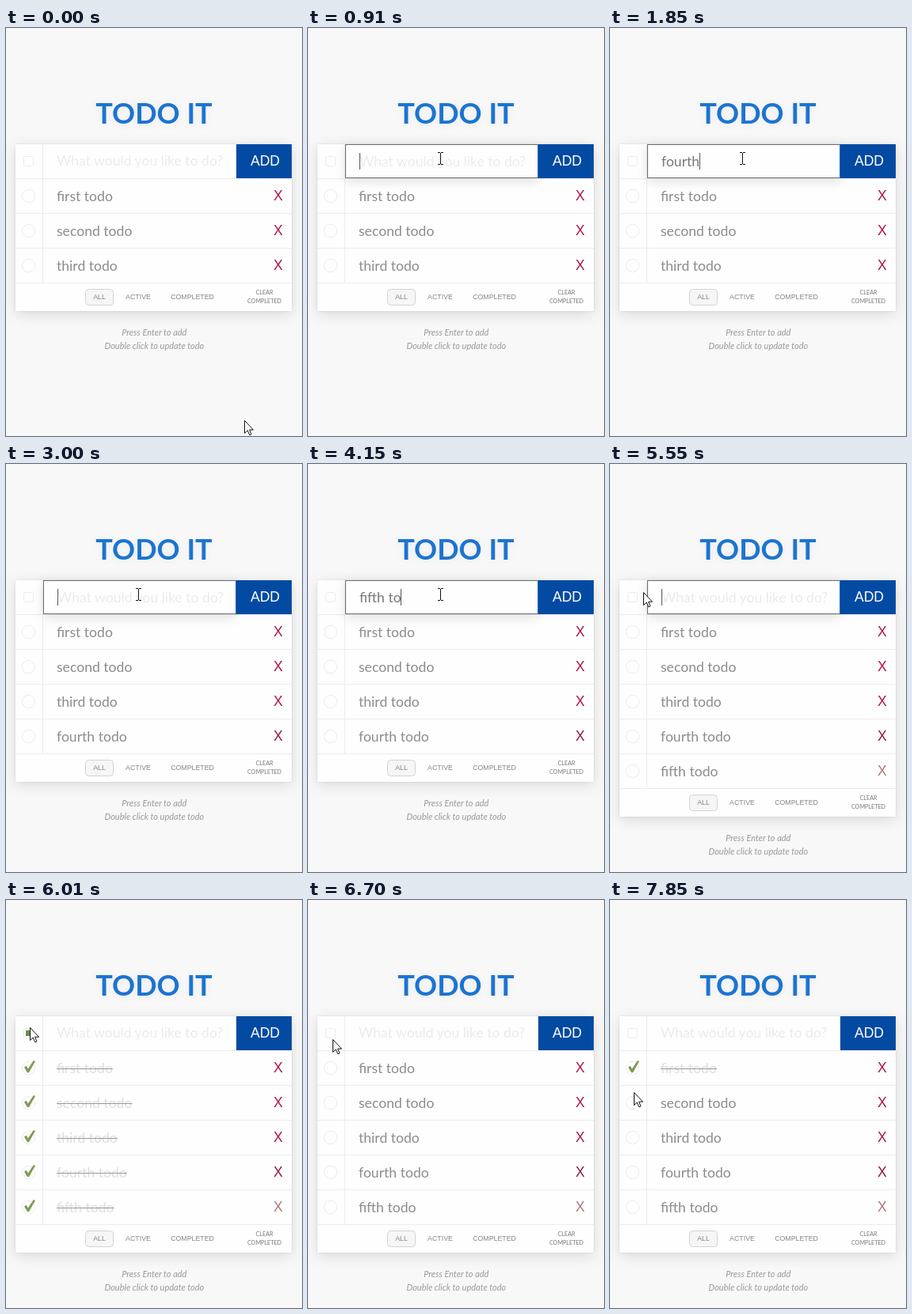
Animation of 374 by 516 pixels, one loop 8000 ms. Source, as an HTML page:

```html
<!DOCTYPE html>
<html lang="en">
<head>
<meta charset="utf-8">
<title>Todo list</title>
<style>
html, body { margin: 0; width: 100%; height: 100%; overflow: hidden; background: #f8f8f8; }
svg { display: block; width: 374px; height: 516px; font: 17.6px Lato, sans-serif; }
.mid { text-anchor: middle; }
.title { font-size: 36px; font-weight: 700; fill: #1b74d1; filter: drop-shadow(0 1px 5px rgba(0,0,0,.06)); }
.card { fill: #fefefe; filter: drop-shadow(0 4px 9px rgba(0,0,0,.12)) drop-shadow(0 0 1px rgba(0,0,0,.1)); }
.line { stroke: #ececec; fill: none; }
.item { fill: #8c8c8c; }
.done { fill: #dedede; }
.strike { stroke: #999; }
.hint { fill: #ebebeb; }
.value { fill: #777; }
.arial { font-family: "Liberation Sans", Arial, sans-serif; }
.filter { font-size: 8.8px; fill: #858585; }
.clear { font-size: 7.2px; fill: #777; }
.info { font-size: 11px; font-style: italic; fill: #999; }
.focus { fill: #fefefe; stroke: #6c6f72; filter: drop-shadow(0 4px 7px rgba(0,0,0,.12)); }
.tick { fill: #829a55; }
</style>
</head>
<body>
<svg id="stage" viewBox="0 0 374 516"></svg>
<script>
const LOOP = 8000, ROW = 44;
const names = ['first', 'second', 'third', 'fourth', 'fifth'].map(n => n + ' todo');
const crosses = ['#b0124a', '#b0124a', '#b0124a', '#951545', '#b27476'];
const stage = document.getElementById('stage');
const ruler = document.createElement('canvas').getContext('2d');

// Each step changes only the listed properties.
const steps = [
  [0, { pointer: 'arrow', x: 301, y: 496, focus: false, caret: true, value: '', rows: 3, done: 0, all: false, pending: false }],
  [210, { x: 264, y: 412 }],
  [440, { x: 203, y: 262 }],
  [670, { pointer: 'beam', x: 167, y: 165 }],
  [910, { focus: true }],
  [1140, { caret: false }],
  [1370, { caret: true, value: 'f' }],
  [1600, { value: 'four' }],
  [1850, { value: 'fourth' }],
  [2080, { value: 'fourth t' }],
  [2310, { value: 'fourth tod' }],
  [2540, { value: 'fourth todo' }],
  [3000, { value: '', rows: 4 }],
  [3460, { value: 'fi' }],
  [3690, { value: 'fift' }],
  [3920, { value: 'fifth' }],
  [4150, { value: 'fifth to' }],
  [4380, { value: 'fifth todo' }],
  [4610, { value: '', rows: 5, pending: true }],
  [4840, { pending: false }],
  [5300, { x: 125, y: 164 }],
  [5530, { pointer: 'arrow', x: 42, y: 162 }],
  [5770, { x: 30, y: 161, focus: false }],
  [6010, { all: true, done: 5 }],
  [6470, { all: false, done: 0 }],
  [6700, { x: 31, y: 176 }],
  [6930, { x: 30, y: 207 }],
  [7160, { done: 1 }],
  [7390, { x: 38, y: 211 }],
  [7620, { x: 36, y: 228 }],
  [7850, { x: 30, y: 243 }]
];
let last = {};
for (const step of steps) last = step[1] = { ...last, ...step[1] };

const text = (x, y, cls, str, extra = '') => `<text x="${x}" y="${y}" class="${cls}" ${extra}>${str}</text>`;
const path = (d, cls, extra = '') => `<path d="${d}" class="${cls}" ${extra}/>`;
const rect = (x, y, w, h, extra) => `<rect x="${x}" y="${y}" width="${w}" height="${h}" ${extra}/>`;

function width(str) {
  ruler.font = '17.6px Lato, sans-serif';
  return ruler.measureText(str).width;
}

function row(name, i, s) {
  const y = 191 + i * ROW;
  if (s.pending && i === s.rows - 1) return rect(12, y, 349, ROW, 'fill="#f6f6f6"');
  const done = i < s.done;
  return path(`M12 ${y + 43.5}H361M46.5 ${y}v43`, 'line') +
    `<circle cx="28.5" cy="${y + 21.5}" r="8.2" class="line"/>` +
    text(64, y + 28, done ? 'done' : 'item', name) +
    (done ? path(`M64 ${y + 22.5}h${width(name)}`, 'strike') +
      path(`M23 ${y + 20.5}l2.8-1.8 2 3.8 7-10.6 2.2 1-8 14.4h-2z`, 'tick') : '') +
    text(338, y + 27, 'arial', 'X', `fill="${crosses[i]}"`);
}

function field(s) {
  const nudge = s.focus ? 1 : 0;
  const caretX = Math.floor(65 + width(s.value)) + .5;
  return (s.focus ? rect(47.5, 147.5, 243, 42, 'class="focus"') : '') +
    text(64 + nudge, 174 + nudge, s.value ? 'value' : 'hint', s.value || 'What would you like to do?') +
    (s.focus && s.caret ? path(`M${caretX} 158v21`, '', 'stroke="#555"') : '');
}

function footer(s) {
  return `<g transform="translate(0 ${(s.rows - 3) * ROW})">` +
    rect(100.5, 330.5, 35, 20, 'rx="4" fill="#f6f6f6" stroke="#d3d3d3"') +
    text(118, 343, 'arial filter mid', 'ALL') +
    text(167, 343, 'arial filter mid', 'ACTIVE') +
    text(235.5, 343, 'arial filter mid', 'COMPLETED') +
    text(326.5, 337, 'clear mid', 'CLEAR') +
    text(326.5, 348, 'clear mid', 'COMPLETED') +
    text(187.3, 389, 'info mid', 'Press Enter to add') +
    text(187.3, 406, 'info mid', 'Double click to update todo') + '</g>';
}

function pointer(s) {
  const shape = s.pointer === 'arrow'
    ? path('M.5.5V16.5L4.2 13 6.8 18.8 9 17.8 6.5 12.2H11.5Z', '', 'fill="#fff" stroke="#111"')
    : path('M-3 -7.5H0M1 -7.5H4M.5 -7V7M-3 7.5H0M1 7.5H4', '', 'fill="none" stroke="#111"');
  return `<g transform="translate(${s.x} ${s.y})">${shape}</g>`;
}

function draw(s) {
  return text(187, 121, 'title mid', 'TODO IT') +
    rect(12, 147, 349, 79 + s.rows * ROW, 'class="card"') +
    path('M12 190.5H361M46.5 147V190', 'line') +
    rect(22.5, 162.5, 12, 12, 'rx="2" class="line"') +
    (s.all ? rect(25, 165, 7, 7, 'fill="#6f8c4c"') : '') +
    names.slice(0, s.rows).map((n, i) => row(n, i, s)).join('') +
    field(s) +
    rect(291, 147, 70, 43, 'fill="#024aa2"') +
    (s.focus ? path('M290.5 148V190', '', 'stroke="#2c70b8"') : '') +
    text(327.5, 174, 'arial mid', 'ADD', 'fill="#fff"') +
    footer(s) + pointer(s);
}

let shown;
function frame(now) {
  const t = now % LOOP;
  const state = steps.findLast(step => step[0] <= t)[1];
  if (state !== shown) stage.innerHTML = draw(shown = state);
  requestAnimationFrame(frame);
}
frame(performance.now());
</script>
</body>
</html>
```
